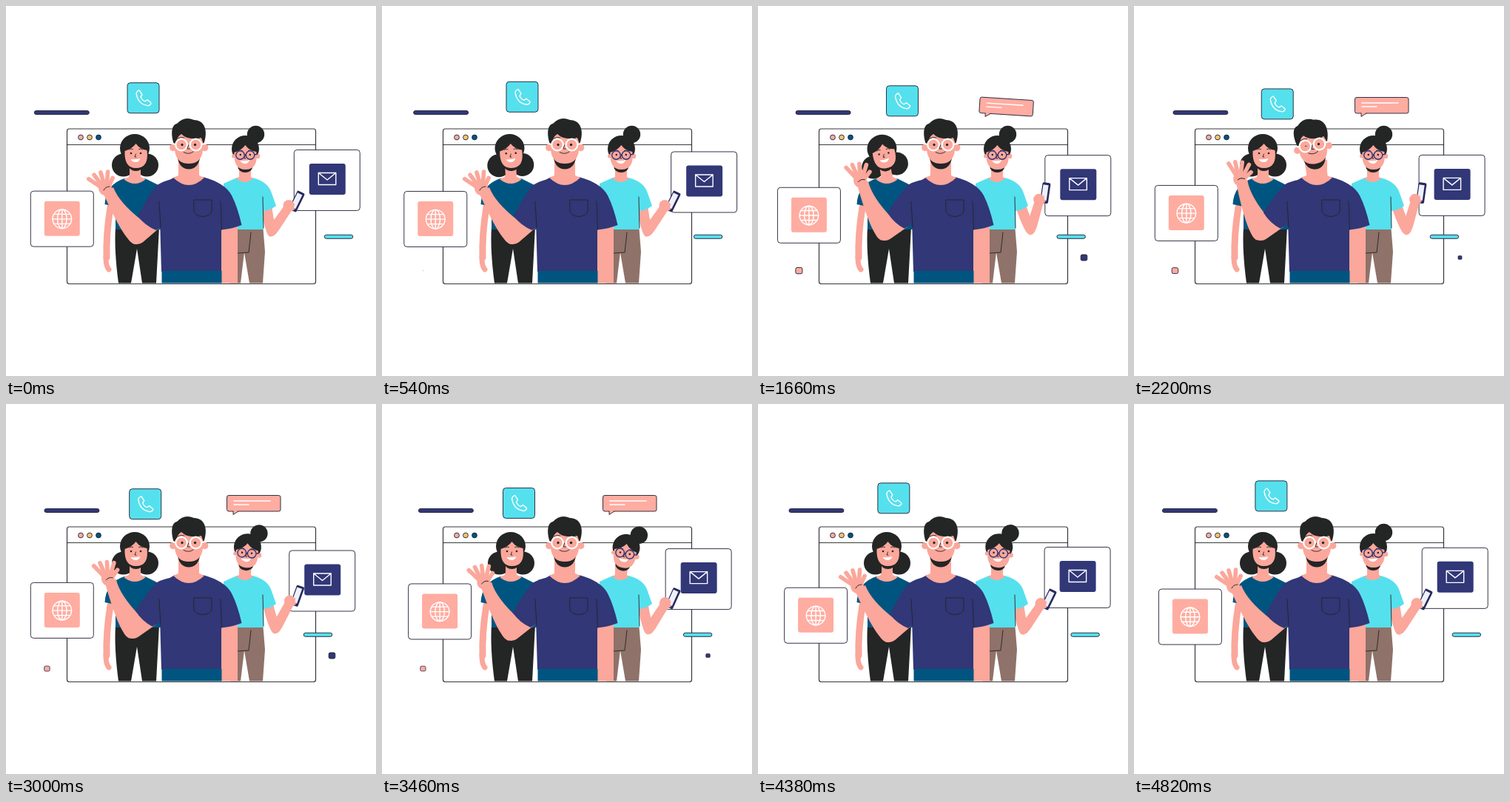
Animation of 500 by 500 pixels, one loop 4.84 s. Source, as an HTML page:

```html
<!DOCTYPE html>
<html lang="en">
<head>
<meta charset="utf-8">
<title>Team</title>
<style>
  html, body { margin: 0; height: 100%; overflow: hidden; background: #fff; }
  svg { display: block; width: 100%; height: 100%; }
  .skin { fill: #fba79b; }
  .hair { fill: #242525; }
  .navy { fill: #313777; }
  .teal { fill: #005580; }
  .cyan { fill: #55e0ee; }
  .pink { fill: #ffaca1; }
  .edge { stroke: #1f1d33; stroke-width: .9; }
  .limb { fill: none; stroke: #fba79b; stroke-linecap: round; }
  .ink { fill: none; stroke: #242525; stroke-width: .9; stroke-linecap: round; }
  .icon { fill: none; stroke: #fff; stroke-width: 1.4; stroke-linejoin: round; stroke-linecap: round; }
</style>
</head>
<body>
<svg viewBox="0 0 500 500">
  <defs>
    <!-- face around the point between the eyes -->
    <g id="face">
      <ellipse class="hair" cy="16" rx="10" ry="8"/>
      <path class="skin" d="M-15-3Q-5-6 0-13Q6-5 15-4Q18 20 0 20Q-16 20-15-3z"/>
      <circle class="hair" cx="-6.500" r="1.300"/><circle class="hair" cx="6.500" r="1.300"/>
      <path class="ink" d="M-9-5q2-2 5-.5M4-5.500q3-1.500 5 .5M0 1l-1.500 4h2"/>
      <path fill="#fff" d="M-7 8Q0 9 6 7Q4 12 0 12Q-5 12-7 8z"/>
    </g>
  </defs>

  <!-- browser window -->
  <rect x="82.5" y="166" width="336" height="209.5" rx="3" fill="#fff" stroke="#38383c" stroke-width="1.2"/>
  <path class="ink" d="M82.5 187.5H418.5"/>
  <g class="edge">
    <circle class="pink" cx="101" cy="177.5" r="3.4"/>
    <circle fill="#f3c670" cx="113" cy="177.5" r="3.4"/>
    <circle class="teal" cx="125" cy="177.5" r="3.4"/>
  </g>

  <!-- floating pieces -->
  <rect id="navyBar" class="navy edge" y="141.5" width="74" height="5" rx="2.5"/>
  <rect id="cyanBar" class="cyan edge" y="309.3" width="38.5" height="5" rx="2.5"/>
  <rect id="navyDot" class="navy edge" x="-4.3" y="-4" width="8.6" height="8" rx="2"/>
  <rect id="pinkDot" class="pink edge" x="-4.3" y="-4" width="8.6" height="8" rx="2"/>
  <g id="call">
    <rect class="cyan edge" width="43" height="41" rx="4"/>
    <path class="icon" d="M16 10l4 6l-2 3q2 5 6 6l3-2l5 4q0 3-4 4Q14 29 12 14q1-3 4-4z"/>
  </g>
  <g id="web">
    <rect class="edge" width="85" height="75" rx="4" fill="#fff"/>
    <rect class="pink" x="18.5" y="13.5" width="48" height="47" rx="3"/>
    <g class="icon" transform="translate(42.5 37.7)">
      <circle r="12.8"/><ellipse rx="6.2" ry="12.8"/>
      <path d="M0-12.8V12.8M-12.8 0H12.8M-11-6.5H11M-11 6.5H11"/>
    </g>
  </g>
  <g id="mail">
    <rect class="edge" width="89" height="82" rx="4" fill="#fff"/>
    <rect class="navy" x="20.5" y="18.5" width="49" height="42" rx="3"/>
    <path class="icon" d="M33 31H56.5V47H33zL44.8 40.5L56.5 31"/>
  </g>
  <g id="bubble">
    <rect class="pink edge" x="298.5" y="123.5" width="72.500" height="21.500" rx="2.5"/>
    <path class="pink" d="M307 144V149.500L314 144z"/>
    <path class="ink" d="M307 145V149.500L314 145"/>
    <path class="icon" d="M308 131H357M308 136H328"/>
  </g>

  <!-- woman on the left -->
  <path class="limb" d="M141 272Q135 310 136 340" stroke-width="9"/>
  <path class="limb" d="M135 340Q135 352 139 356" stroke-width="7"/>
  <path class="hair" d="M148 299H207L203 374.5H184L177 328L169 374.5H152Q146 330 148 299z"/>
  <path class="teal" d="M160 233H188L210 244V302H148V271L133.500 268Q135 241 160 233z"/>
  <path class="skin" d="M166 214H182V231L189 234Q174 246 159 234L166 231z"/>
  <g id="leftHead">
    <ellipse class="hair" cx="174" cy="192" rx="20" ry="19"/>
    <circle class="hair" cx="158.5" cy="215" r="15.5"/><circle class="hair" cx="190.500" cy="215" r="15.500"/>
    <rect class="skin" x="167" y="212" width="15" height="22"/>
    <use href="#face" x="175.5" y="199"/>
  </g>

  <!-- woman on the right -->
  <path fill="#8f7269" d="M305 301H347.5L350 332L347 374.5H329L322 333L317 374.5H303z"/>
  <path class="ink" d="M313 334L328 333L331 306"/>
  <g id="rightArm">
    <path class="limb" d="M352 268Q354 290 359 304" stroke-width="14"/>
    <g id="rightFore">
      <path class="skin" d="M352 303Q355 320 368 304L387 275L378 267L360 292z"/>
      <g transform="rotate(26 393 264)">
        <rect x="387.5" y="250" width="11" height="28" rx="2" fill="#272a5c"/>
        <rect x="388.7" y="253" width="7.2" height="21" fill="#eef0fa"/>
      </g>
      <ellipse class="skin" cx="382" cy="270" rx="7.500" ry="8"/>
      <path class="limb" d="M383 266L388 268M384 272L388 274" stroke-width="4"/>
    </g>
  </g>
  <path class="cyan" d="M312 232H333Q354 237 359 253L365 270Q357 276 348 277V302H294V240z"/>
  <path class="ink" d="M347 258L348 300"/>
  <path class="skin" d="M315 214H331V231L334 233Q323 243 311 233L315 231z"/>
  <g id="rightHead">
    <circle class="hair" cx="337.5" cy="173.5" r="11.7"/>
    <ellipse class="hair" cx="323.500" cy="193" rx="18.500" ry="18"/>
    <circle class="skin" cx="340" cy="203" r="3.300"/><circle class="skin" cx="307.500" cy="203" r="2.500"/>
    <rect class="skin" x="315" y="212" width="16" height="20"/>
    <use href="#face" x="323.300" y="201"/>
    <g fill="none" stroke="#303676" stroke-width="1.4">
      <circle cx="316.5" cy="201.5" r="5.8"/><circle cx="330" cy="201.5" r="5.8"/><path d="M322 201h2M336 201l4-1"/>
    </g>
  </g>

  <!-- man -->
  <rect class="skin" x="291" y="296" width="22" height="78.5"/>
  <g id="leftArm">
    <path class="limb" d="M206 284L177 309" stroke-width="26"/>
    <g id="leftFore">
      <path class="skin" d="M131 252L145 245Q153 266 184 290Q190 318 174 322Q160 318 131 252z"/>
      <g id="hand"><ellipse class="skin" cx="134" cy="246" rx="9" ry="10"/><path class="ink" d="M132 249q2-5 8-5"/></g>
    </g>
    <path class="navy" d="M232 232Q208 237 201 245Q190 260 178 284Q188 297 203 303L222 290z"/>
  </g>
  <path class="navy" d="M228 231H266Q296 239 305 256Q313 272 318.5 296Q306 301 291 302.5V359H210L207 255Q212 239 228 231z"/>
  <rect class="teal" x="210.5" y="358" width="81" height="16.5"/>
  <path class="ink" d="M207 264L209 299M290 264L291.5 302M254 262H278V277Q277 284 266 284.500Q255 284 254 277z"/>
  <path class="skin" d="M233 208H261V229L268 232Q247 252 226 232L233 229z"/>
  <g id="manHead">
    <rect class="skin" x="233" y="205" width="28" height="26"/>
    <circle class="skin" cx="225.800" cy="191.500" r="4.700"/><circle class="skin" cx="268.700" cy="191.500" r="4.700"/>
    <path class="hair" d="M232 206H262Q259 220 247 220.500Q235 220 232 206z"/>
    <path class="skin" d="M228 172H266V195Q264 213 247 213Q230 213 228 195z"/>
    <path class="hair" d="M227 187C222 172 224 160 231 159Q241 148 254 154C268 154 274 168 267 187L264 178Q246 182 237 173Q231 176 230 186z"/>
    <path class="ink" d="M232 179q5-3 9-1M252 178q5-2 9 1" stroke-width="1.600"/>
    <g fill="none" stroke="#fff" stroke-width="2.2">
      <circle cx="237" cy="187.5" r="7.800"/><circle cx="256.500" cy="187.500" r="7.800"/>
      <path d="M244.800 187h4M229 187l-4-1M264.500 187l5-1"/>
    </g>
    <ellipse id="wink" class="hair" cx="238" cy="187.500" rx="1.600"/>
    <circle class="hair" cx="255.500" cy="187.500" r="1.700"/>
    <path class="ink" d="M247 187l-2 6h3.500M240 197.500q7 4 13-.5"/>
  </g>
</svg>
<script>
const LOOP = 4840;
const el = id => document.getElementById(id);
const set = (id, value) => el(id).setAttribute('transform', value);
const move = (id, x, y, size = 1) => set(id, `translate(${x} ${y}) scale(${size})`);
const spin = (id, angle, x, y) => set(id, `rotate(${angle} ${x} ${y})`);

const turn = (t, period = LOOP) => Math.cos(2 * Math.PI * t / period);
const ramp = (t, from, to) => (1 - Math.cos(Math.PI * Math.min(1, Math.max(0, (t - from) / (to - from))))) / 2;
// Eases from 0 to 1, stays there, then eases back.
const hold = (t, a, b, c, d) => ramp(t, a, b) - ramp(t, c, d);

// Fan of fingers, ending with the shorter thumb.
for (let i = 0; i < 5; i++) {
  const length = i < 4 ? 22 : 15;
  el('hand').insertAdjacentHTML('afterbegin',
    `<path class="limb" stroke-width="5.6" d="M0 0V${-length}" transform="translate(${130 + 2 * i} 246) rotate(${20 * i - 56})"/>`);
}

function draw(t) {
  // Tiles drift on small ellipses.
  const drift = (id, x, y, rx, ry, peakX, peakY) =>
    move(id, x + rx * turn(t - peakX), y + ry * turn(t - peakY));
  drift('call', 167.5, 108.5, 6, 6.2, 1690, 2960);
  drift('web', 31.4, 245.9, 5.1, 4.7, 3920, 350);
  drift('mail', 386.7, 197.6, 4, 4.2, 670, 1870);

  const slide = Math.sin(Math.PI * t / LOOP) ** 1.15;
  move('navyBar', 38.3 + 14.8 * slide, 0);
  move('cyanBar', 430.3 - 30.5 * slide, 0);

  move('navyDot', 440.5, 340, hold(t, 500, 900, 3300, 3700) * (1 - .4 * hold(t, 1660, 2200, 2200, 2700)));
  move('pinkDot', 55.4, 357.6, hold(t, 400, 1080, 3940, 4400) * (.95 + .12 * turn(t - LOOP / 4)));

  const tilt = 16 * (1 - hold(t, 1040, 1950, 3650, 4300));
  const size = hold(t, 1000, 1620, 3700, 4300);
  set('bubble', `translate(307 149) rotate(${tilt}) scale(${size}) translate(-307 -149)`);

  spin('leftHead', -9 * hold(t, 350, 950, 1700, 2180), 176, 234);
  spin('manHead', -9 * hold(t, 1680, 2150, 2450, 2950), 247, 225);
  spin('rightHead', 10.5 * hold(t, 2700, 3350, 3980, 4650), 322, 229);
  el('wink').setAttribute('ry', 1.8 - 1.3 * hold(t, 1980, 2120, 2400, 2520));

  const raise = hold(t, 700, 1640, 3050, 3800);
  const wave = raise * (4 + 2 * turn(t - 2250, 1400));
  spin('leftArm', 6 * raise, 222, 252);
  spin('leftFore', wave, 175, 309);
  spin('hand', 2 * wave, 138, 250);

  spin('rightArm', -11 * hold(t, 1080, 1640, 2250, 3900), 350, 255);
  spin('rightFore', -7 * hold(t, 1080, 1640, 2250, 2850), 358, 303);
}

function frame(now) {
  draw(now % LOOP);
  requestAnimationFrame(frame);
}
requestAnimationFrame(frame);
</script>
</body>
</html>
```
